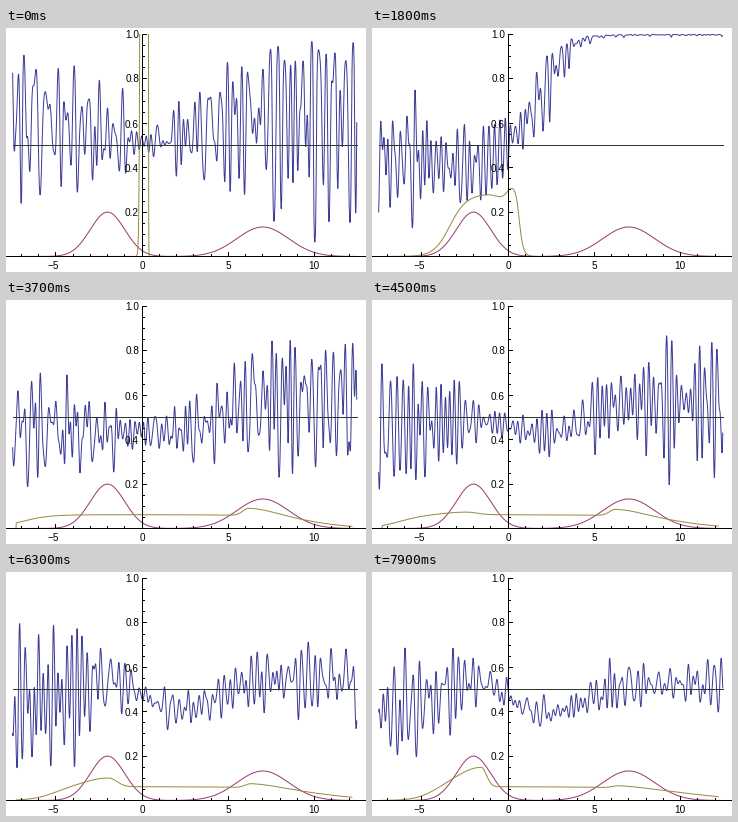
A matplotlib script that plays this animation: 360 by 244 pixels, repeating every 8 s.

```python
import numpy as np
import matplotlib.pyplot as plt
from matplotlib.animation import FuncAnimation

W, H, DPI = 360, 244, 100
FRAMES, STEP = 80, 100
PX = 72 / DPI  # points per pixel
BLUE, PURPLE, OLIVE, RULE = "#3d3d99", "#993d71", "#998b3d", "#2b3a30"
X = np.linspace(-7.5, 12.45, 1600)
XG = np.linspace(-7.4, 12.2, 4000)


def px(x):
    return 136 + 17.25 * x


def py(y):
    return 228.5 - 222 * y


def sigmoid(z):
    return (1 + np.tanh(z / 2)) / 2


def bump(x, mid, left, right):
    """Bell with separate widths on each side."""
    return np.exp(-((x - mid) / np.where(x < mid, left, right)) ** 2 / 2)


def ease(i, times, values):
    return np.interp(i, times, values)


def data_density(x):
    return .2 * bump(x, -2, 1, 1) + .133 * bump(x, 7, 1.5, 1.5)


def generator(x, i):
    """A spike that spreads to a plateau, then gathers near the data."""
    lo = ease(i, [0, 18, 29, 37, 53, 79], [-.1, -3.4, -7.25, -7, -5.6, -4.4])
    hi = ease(i, [0, 18, 29, 37, 79], [.37, .65, 7.8, 9.8, 10.5])
    lo_soft = ease(i, [0, 18, 29, 37, 79], [.03, .45, .06, .8, .6])
    hi_soft = ease(i, [0, 18, 29, 37, 79], [.006, .1, 1, 1.4, 1.8])
    level = np.exp(ease(i, [0, 18, 29], np.log([4, .25, .062])))
    front = ease(i, [0, 18, 29, 37, 79], [.2, .3, 4.9, 6.2, 6.4])
    crest = ease(i, [0, 18, 29, 79], [0, .06, .038, .01])
    hump = ease(i, [0, 18, 29, 37, 63, 79], [0, .03, 0, 0, .04, .088])
    hump_at = ease(i, [18, 37, 79], [-1.2, -2.6, -1.55])
    y = level * sigmoid((x - lo) / lo_soft) * sigmoid((hi - x) / hi_soft)
    y += crest * bump(x, front, .35, ease(i, [18, 29], [.4, 1.5]))
    y += hump * bump(x, hump_at, 1.4, ease(i, [53, 79], [.6, .3]))
    return y * (x > -7.3)


def ripple(x, i, waves=40):
    """Band-limited noise of unit variance, fresh in every frame."""
    rng = np.random.default_rng(400 + i)
    freq = 2 * np.pi * rng.normal(2.8, .9, (waves, 1))
    phase = rng.uniform(0, 2 * np.pi, (waves, 1))
    return np.cos(freq * x + phase).sum(0) * np.sqrt(2 / waves)


def discriminator(x, i):
    west, east = np.maximum(-x, 0), np.maximum(x, 0)
    tilt = ease(i, [0, 18, 53, 79], [.65, -.3, -.2, -.5]) / 7.5
    swell = ease(i, [0, 18, 29, 53, 79], [0, -.4, -.45, .3, .35])
    dip = ease(i, [0, 29, 37, 79], [0, .6, .25, .45])
    rise = ease(i, [0, 18, 29, 37, 79], [.7, 7, 1.3, .35, .1])
    bend = ease(i, [18, 29], [4, 4.8])
    soft = ease(i, [18, 29], [1.5, .5])
    mean = (tilt * west + swell * bump(x, -2, 1.6, 1.6)
            - dip * bump(x, 2, 2, 2.2) + rise * sigmoid((x - bend) / soft))
    amp = (ease(i, [0, 18, 40], [.15, .24, .11])
           + west * ease(i, [0, 33, 55, 65, 79], [.1, .05, .1, .1, .07])
           + east * ease(i, [0, 37, 79], [.09, .055, .012]))
    return sigmoid(mean + amp * ripple(x, i))


fig = plt.figure(figsize=(W / DPI, H / DPI), dpi=DPI, facecolor="white")
ax = fig.add_axes([0, 0, 1, 1])
ax.set(xlim=(0, W), ylim=(H, 0))
ax.axis("off")


def stroke(x, y, color="black", z=5):
    return ax.plot(x, y, color=color, lw=PX, zorder=z, snap=False,
                   solid_capstyle="butt")[0]


def label(x, y, text, ha):
    ax.text(x, y, text, ha=ha, va="center_baseline", fontsize=10 * PX,
            family="Liberation Sans", color="black")


def draw_axes():
    stroke([0, W], [228.5, 228.5])
    stroke([136.5, 136.5], [6, 229])
    for n in range(-7, 13):
        x = np.floor(px(n)) + .5
        stroke([x, x], [228.5, 224 if n % 5 == 0 else 226])
        if n % 5 == 0:
            label(x - (2 if n < 0 else .5), 237,
                  str(n).replace("-", "\u2212"), "center")
    for n in range(1, 21):
        y = np.floor(py(n / 20)) + .5
        stroke([136.5, 141 if n % 4 == 0 else 139], [y, y])
        if n % 4 == 0:
            label(133, y, f"{n / 20:.1f}", "right")


draw_axes()
disc = stroke(px(X), py(0 * X), BLUE, z=2)
stroke(px(X), py(data_density(X)), PURPLE, z=3)
gen = stroke(px(XG), py(0 * XG), OLIVE, z=3.5)
stroke([7, 352], [117.5, 117.5], RULE, z=4)
gen.set_clip_path(plt.Rectangle((0, 6), W, H, transform=ax.transData))


def update(i):
    disc.set_ydata(py(discriminator(X, i)))
    gen.set_ydata(py(generator(XG, i)))
    return disc, gen


anim = FuncAnimation(fig, update, frames=FRAMES, interval=STEP,
                     repeat=True, repeat_delay=0)
plt.show()
```
